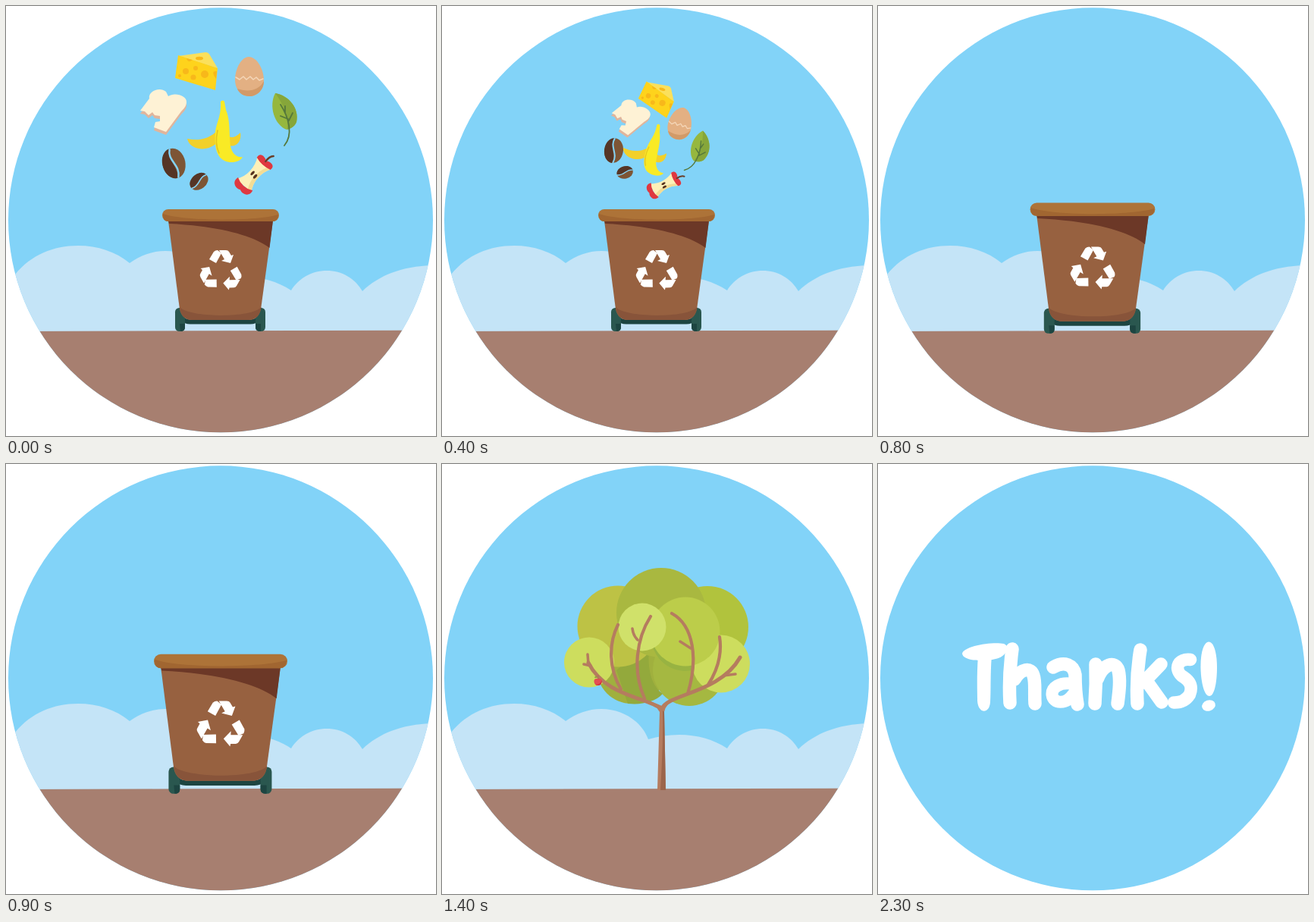
An HTML page for the animation above (3.1 s loop, 567 px wide and 567 px high).

```html
<!DOCTYPE html>
<html lang="en">
<head>
<meta charset="utf-8">
<title>From scraps to apples</title>
<style>
  html, body { margin: 0; width: 100%; height: 100%; overflow: hidden; background: #fff; }
  svg { display: block; width: 100%; height: 100%; }
  .line { fill: none; stroke-linecap: round; stroke-linejoin: round; }
</style>
</head>
<body>
<svg viewBox="0 0 567 567">
  <defs>
    <clipPath id="disc"><circle cx="283" cy="282.3" r="280"/></clipPath>
    <g id="beanShape">
      <ellipse rx="15" ry="20" fill="#7d5535"/>
      <path d="M-2-20C-20-18-20 18 0 20C6 8-8-4-2-20Z" fill="#553526"/>
      <path class="line" d="M-2-19C-8-5 8 3 2 19" stroke="#82d3f8" stroke-width="2.4"/>
    </g>
    <g id="recycleArrow">
      <path d="M268 334L274 324Q276 322 279 322L284 326L277 339Z"/>
      <path d="M281 322H290Q293 322 294 324L297 329L300 328L296 339L284 336L288 334Z"/>
    </g>
    <path id="spark" d="M0-8Q1-1 6 0Q1 1 0 8Q-1 1-6 0Q-1-1 0-8Z" fill="#fdea2b"/>
  </defs>

  <g clip-path="url(#disc)">
    <rect width="567" height="567" fill="#82d3f8"/>

    <g id="land">
      <path fill="#c4e4f7" d="M0 372L12 354C33 328 63 316 95 316C121 316 145 324 163 339C177 329 193 323 210 323C238 323 263 339 272 363C285 359 299 357 313 357C336 357 358 363 376 375C386 359 403 349 423 349C443 349 460 359 470 376C492 355 524 342 567 342V435H0Z"/>
      <path fill="#a77f70" d="M0 429L567 427.5V567H0Z"/>

      <g id="food">
        <g id="banana">
          <path fill="#f2d02a" d="M282 160C272 174 256 179 239 175C241 185 253 190 263 188C276 186 284 176 288 165ZM290 170C298 176 304 172 309 167C311 177 305 187 294 184Z"/>
          <path fill="#f9ea25" d="M283 126Q286 123 288 126L290 137C296 150 294 170 296 185C299 197 306 200 312 199C309 206 296 208 288 204C276 198 275 182 276 166C278 152 284 145 283 126Z"/>
          <path class="line" d="M279 164Q275 182 281 194" stroke="#e5c320" stroke-width="1.5"/>
        </g>
        <g id="apple"><g transform="translate(327 222) rotate(42)">
          <path fill="#fdf0b8" d="M-12-20C-5-8-5 8-13 20H13C5 8 5-8 12-20Z"/>
          <path fill="#f3dc95" d="M7-18C0-5 1 8 7 20H13C5 8 5-8 12-20Z"/>
          <path fill="#df3840" d="M-12-19C-14-28-4-27 0-24C4-27 14-28 12-19Q0-15-12-19ZM-13 17Q0 24 13 17C16 28 4 30 0 27C-4 30-16 28-13 17Z"/>
          <ellipse cx="-2.5" rx="1.7" ry="3.5" fill="#57331f"/>
          <ellipse cx="3" cy="1" rx="1.7" ry="3.5" fill="#57331f"/>
          <path class="line" d="M0-23Q-1-31 3-35" stroke="#683f2b" stroke-width="2.5"/>
        </g></g>
        <g id="leaf">
          <path fill="#96b73e" d="M355 115C373 118 387 135 383 153C380 160 374 162 370 163C354 157 346 132 355 115Z"/>
          <path fill="#86a63a" d="M355 115C373 118 387 135 383 153C380 160 374 162 371 163Q373 139 355 115Z"/>
          <path class="line" stroke="#55783b" stroke-width="1.8" d="M362 130C373 147 379 170 367 184M372 149L362 145M373 151L378 141M368 141L368 132"/>
        </g>
        <g id="egg">
          <path fill="#e3b083" d="M320 67C331 67 340 84 340 98C340 111 331 119 321 119C311 119 302 111 302 97C302 82 311 67 320 67Z"/>
          <path fill="#d29a68" d="M305 109C319 114 333 112 340 99C340 111 331 119 321 119C313 119 307 115 305 109Z"/>
          <path class="line" d="M303 94L308 97L313 93L317 97L322 93L326 97L330 94L334 98L339 96" stroke="#f5d7b9" stroke-width="1.5"/>
        </g>
        <g id="bread">
          <path id="slice" fill="#e0b59c" transform="translate(0 4)" d="M189 122C187 112 203 106 211 113L214 119C222 113 239 118 238 127C238 132 234 136 231 139L211 166L195 160L197 153L203 152L203 145L196 144L193 140L188 144L183 139L177 138Z"/>
          <path fill="#fef2d5" d="M189 122C187 112 203 106 211 113L214 119C222 113 239 118 238 127C238 132 234 136 231 139L211 166L195 160L197 153L203 152L203 145L196 144L193 140L188 144L183 139L177 138Z"/>
        </g>
        <g id="cheese">
          <path fill="#fbe05b" d="M227 66L263 61Q267 61 269 65L279 82Z"/>
          <path fill="#fed31c" d="M227 65L279 82L276 111L223 95Z"/>
          <g fill="#f8b81a">
            <ellipse cx="255" cy="69" rx="5" ry="2.3"/><circle cx="237" cy="86" r="4"/>
            <circle cx="247" cy="94" r="3.6"/><circle cx="262" cy="90" r="5"/>
            <circle cx="250" cy="82" r="3"/><circle cx="229" cy="92" r="2"/>
            <path d="M238 69Q240 76 246 71ZM278 86Q269 85 277 96Z"/>
          </g>
        </g>
        <g id="bean"><use href="#beanShape" transform="translate(221.5 207.5) rotate(-12)"/></g>
        <g id="smallBean"><use href="#beanShape" transform="translate(254.5 231.5) rotate(52) scale(.66)"/></g>
      </g>

      <g id="bin">
        <path class="line" d="M229 404Q230 416 243 416.500H322Q335 416 336 404" stroke="#1d4541" stroke-width="6"/>
        <g fill="#2a574f">
          <rect x="223" y="398" width="13" height="31" rx="5.500"/>
          <rect x="329" y="398" width="13" height="31" rx="5.500"/>
        </g>
        <path fill="#1d4541" d="M229 419H236V424Q236 429 230 429ZM329 419H336V429Q329 429 329 424Z"/>
        <path fill="#976140" d="M214 283H352L336 400Q333 414 319 414H246Q232 414 229 400Z"/>
        <path fill="#88543a" d="M229 397C241 411 324 412 336.500 397Q334 414 319 414H246Q231 414 229 397Z"/>
        <path fill="#6c3827" d="M214 283H352L347.500 319C326 302 278 290 215 287Z"/>
        <rect x="206" y="268" width="154" height="16" rx="8" fill="#ad7338"/>
        <path fill="#a16631" d="M207 274C235 284 330 284 359 275Q359 284 351 284H214Q206 284 207 274Z"/>
        <g fill="#fff">
          <use href="#recycleArrow"/>
          <use href="#recycleArrow" transform="rotate(120 283.5 349.5)"/>
          <use href="#recycleArrow" transform="rotate(240 283.5 349.5)"/>
        </g>
      </g>

      <g id="tree">
        <circle cx="350" cy="215" r="54" fill="#b1c33d"/>
        <circle cx="250" cy="270" r="46" fill="#a0b03e"/>
        <circle cx="326" cy="271" r="48" fill="#a5b841"/>
        <path fill="#93a93c" d="M276 231C268 260 274 292 291 303C281 314 262 318 245 316L230 272Z"/>
        <circle cx="232" cy="214" r="53.500" fill="#bdc245"/>
        <circle cx="289" cy="196" r="59" fill="#a9b840"/>
        <circle cx="321" cy="228" r="45" fill="#98b342"/>
        <circle cx="368" cy="263.500" r="38" fill="#cddd5e"/>
        <circle cx="321" cy="221" r="45.500" fill="#bccd4a"/>
        <circle cx="194" cy="261.500" r="33" fill="#cddd5e"/>
        <circle cx="264" cy="215" r="31.500" fill="#d0e16a"/>
        <g class="line" stroke="#b57c5f">
          <path d="M290 323C268 307 215 306 193 262" stroke-width="5"/>
          <path d="M290 323C296 303 366 303 393 255" stroke-width="5"/>
          <path d="M236 297C219 268 220 236 232 212M267 309C251 273 256 231 275 201M324 303C338 257 332 213 303 197M351 291C365 269 369 247 366 228" stroke-width="4.200"/>
          <path d="M258 232Q252 226 251 217M328 243L314 234M196 266L187 264M193 263L192 251M387 277L371 279" stroke-width="3.500"/>
        </g>
        <path fill="#b57c5f" d="M284 430L287 327Q281 317 272 312L290 319L308 310Q295 316 293 327L295 430Z"/>
        <path fill="#9b654b" d="M288 430Q292 365 291 325L293 327L295 430Z"/>
      </g>

      <g id="fruit">
        <path class="line" d="M204 301Q204 288 207 279" stroke="#a66949" stroke-width="2"/>
        <path fill="#829b35" d="M185 291Q192 282 201 291Q193 296 185 291Z"/>
        <path fill="#e44e54" d="M204 301C211 294 225 298 225 311C225 323 217 336 204 332C192 336 184 323 184 311C184 298 197 294 204 301Z"/>
        <path fill="#d12f38" d="M224 306C227 323 217 336 204 332C198 334 194 332 191 328C208 331 220 323 224 306Z"/>
        <path class="line" d="M199 300Q204 304 209 300" stroke="#b53338" stroke-width="1.500"/>
        <g id="sparks">
          <use href="#spark" x="219.500" y="313"/>
          <use href="#spark" transform="translate(211 324) scale(.7)"/>
        </g>
      </g>
    </g>

    <g id="thanks" role="img" aria-label="Thanks!" fill="#fff">
      <path d="M111 250C113 240 150 234 166 237C174 240 170 254 155 257C140 261 112 260 111 250Z"/>
      <path d="M132 252C130 280 131 300 131 312C132 330 147 330 148 314C149 300 148 275 150 252Z"/>
      <g class="line" stroke="#fff" stroke-width="17.500">
        <path d="M177 244Q172 280 174 315M180 284C188 270 202 267 205 279C208 288 206 300 207 316"/>
        <path d="M231 268C245 260 258 264 260 278Q260 300 263 317"/>
        <path d="M257 290C239 287 229 295 229.500 304C231 317 248 317 257 304" stroke-width="16"/>
        <path d="M287 264Q288 290 286 316M289 284C297 263 313 259 317 272C320 285 318 300 316 316"/>
        <path d="M346 245Q340 280 342 316M373 264L350 288M354 286L374 314"/>
        <path d="M412 258C396 256 390 269 400 279C412 286 415 294 411 304Q404 315 390 314.500" stroke-width="16.500"/>
      </g>
      <path d="M436 234.500C443 234 447 250 447 268C447 290 443 306 437 306C430 306 426 288 425.500 270C425 250 429 235 436 234.500Z"/>
      <ellipse cx="436" cy="318.500" rx="9" ry="7" transform="rotate(-18 436 318.500)"/>
    </g>
  </g>
</svg>
<script>
const el = id => document.getElementById(id);
const STEP = 100, STEPS = 31;

// Poses [x, y, turn] at the start, at fall step 3 and at fall step 5.
const falls = {
  cheese:    [[251, 86, 0],  [283, 122, 18], [301, 183, 40]],
  egg:       [[321, 93, 0],  [314, 155, 14], [314, 220, 22]],
  bread:     [[208, 140, 0], [248, 149, 14], [272, 197, 26]],
  leaf:      [[367, 149, 0], [336, 193, 35], [311, 258, 48]],
  banana:    [[276, 166, 0], [270, 187, 14], [275, 238, 14]],
  apple:     [[327, 222, 0], [293, 236, 20], [277, 273, 62]],
  bean:      [[221, 208, 0], [226, 191, 22], [246, 219, 45]],
  smallBean: [[254, 231, 0], [241, 219, 25], [249, 251, 40]]
};
const binScale = { 8: 1.07, 9: 1.143, 10: .57 };

// Parabola through a, b, c at k = 0, 3, 5.
const curve = (k, a, b, c) =>
  a * (k - 3) * (k - 5) / 15 - b * k * (k - 5) / 6 + c * k * (k - 3) / 10;

const show = (id, on) => el(id).style.display = on ? '' : 'none';

function place(id, x, y, turn, scale, px = x, py = y) {
  el(id).setAttribute('transform',
    `translate(${x} ${y}) rotate(${turn}) scale(${scale}) translate(${-px} ${-py})`);
}

function draw(step) {
  const fall = Math.min(Math.max(step - 1, 0), 5);
  const size = curve(fall, 1, .82, .76);
  for (const [id, [a, b, c]] of Object.entries(falls)) {
    const [x, y, turn] = a.map((v, i) => curve(fall, v, b[i], c[i]));
    place(id, x, y, turn, size, a[0], a[1]);
  }
  place('bin', 283, 388, 0, binScale[step] || 1);
  place('tree', 289, 429, 0, step < 13 ? .55 : 1);
  place('fruit', 206, 278, 0, Math.min(1, Math.max(0, step - 13) / 4));

  show('land', step < 23);
  show('thanks', step >= 23);
  show('food', step < 7);
  show('bin', step < 11);
  show('tree', step >= 12);
  show('fruit', step >= 14);
  show('sparks', step >= 18);
}

const start = performance.now();
function tick() {
  draw(Math.floor((performance.now() - start) / STEP) % STEPS);
  requestAnimationFrame(tick);
}
tick();
</script>
</body>
</html>
```
